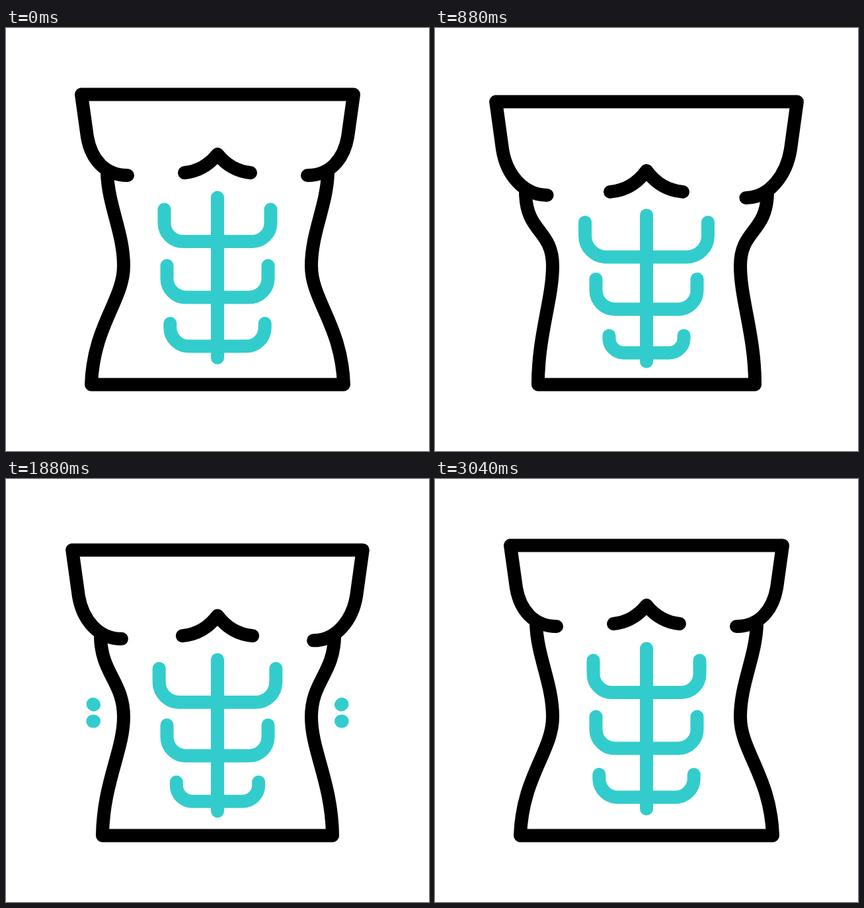
An HTML page that plays this animation: 640 by 640 pixels, repeating every 3.6 s.

```html
<!DOCTYPE html>
<html lang="en">
<head>
<meta charset="utf-8">
<title>Torso</title>
<style>
  html, body { margin: 0; width: 100%; height: 100%; overflow: hidden; background: #fff; }
  svg { display: block; width: 100%; height: 100%; }
  path { fill: none; stroke-width: 20; stroke-linecap: round; stroke-linejoin: round; }
  .body path { stroke: #000; }
  .abs path { stroke: #33cccc; }
</style>
</head>
<body>
<svg viewBox="0 0 640 640">
  <g class="abs" id="abs"></g>
  <g class="body" id="body"></g>
</svg>
<script>
const LOOP = 3600;
const TURNS = [0, 750, 1480, 2210, 3040]; // relaxed, flexed, relaxed, flexed, relaxed
const FLEX = 1.05;
const MARKS = { from: 1860, peak: 2210, to: 2480, reach: 28 };

// Each pair holds the relaxed and the flexed outline.
const bodyShapes = [
  ['M184 223C150 223 129 199 123 165L114 100.5L526 100.5L517 165C511 199 490 223 456 223',
   'M169.5 253C134 253 108 222 102 184L92 111.5L548 111.5L538 184C532 222 506 257 470.5 257'],
  ['M153 220C155 270 178 310 178 360C178 412 132 450 129 539.5L511 539.5C508 450 462 412 462 360C462 310 485 270 487 220',
   'M137 250C138 310 178 305 178 360C178 410 156 465 156 539.5L484 539.5C484 465 462 410 462 360C462 305 502 310 503 250'],
  ['M270 219Q300 216 320 191Q340 216 370 219',
   'M265 248Q299 245 320 216Q341 245 375 248']
];

// Cup shape: left edge x, top y, bar y, corner radius.
const cup = (x, top, bar, r) =>
  `M${x} ${top}L${x} ${bar - r}A${r} ${r} 0 0 0 ${x + r} ${bar}` +
  `L${640 - x - r} ${bar}A${r} ${r} 0 0 0 ${640 - x} ${bar - r}L${640 - x} ${top}`;

const absShapes = [
  ['M320 256.5L320 499', 'M320 283.5L320 504.5'],
  [cup(239.5, 274.5, 323, 28), cup(227, 294, 346.5, 32)],
  [cup(243.5, 359.5, 407.5, 28.5), cup(243.5, 380, 425.5, 28.5)],
  [cup(248.3, 447, 481.5, 28), cup(263.5, 465.5, 491.5, 22)]
];

// Short strokes beside the waist: start point and direction.
const markShapes = [
  [133, 341.5, -0.87, -0.5], [133, 366.5, -1, 0],
  [507, 341.5, 0.87, -0.5], [507, 366.5, 1, 0]
];

function addPath(group) {
  const path = document.createElementNS('http://www.w3.org/2000/svg', 'path');
  document.getElementById(group).append(path);
  return path;
}

function morph(group, [rest, flexed]) {
  const path = addPath(group);
  const target = flexed.match(/-?[\d.]+/g).map(Number);
  return s => {
    let i = 0;
    path.setAttribute('d', rest.replace(/-?[\d.]+/g, n => +n + (target[i++] - n) * s));
  };
}

const morphs = [
  ...absShapes.map(s => morph('abs', s)),
  ...bodyShapes.map(s => morph('body', s))
];
const marks = markShapes.map(() => addPath('abs'));

// Same curve as cubic-bezier(.5, 0, .5, 1).
function ease(x) {
  let lo = 0, hi = 1;
  for (let i = 0; i < 20; i++) {
    const t = (lo + hi) / 2;
    if (1.5 * t * (1 - t) + t ** 3 < x) lo = t; else hi = t;
  }
  return lo * lo * (3 - 2 * lo);
}

function flexAt(t) {
  const i = TURNS.findIndex(end => end > t) - 1;
  if (i < 0) return 0;
  const e = ease((t - TURNS[i]) / (TURNS[i + 1] - TURNS[i]));
  return FLEX * (i % 2 ? 1 - e : e);
}

function markLength(t) {
  const { from, peak, to, reach } = MARKS;
  return reach * Math.min((t - from) / (peak - from), (to - t) / (to - peak));
}

function draw() {
  const t = performance.now() % LOOP;
  const s = flexAt(t);
  morphs.forEach(m => m(s));
  const len = markLength(t);
  marks.forEach((path, i) => {
    const [x, y, dx, dy] = markShapes[i];
    path.setAttribute('d', len > 0 ? `M${x} ${y}l${dx * len} ${dy * len}` : '');
  });
  requestAnimationFrame(draw);
}
draw();
</script>
</body>
</html>
```
